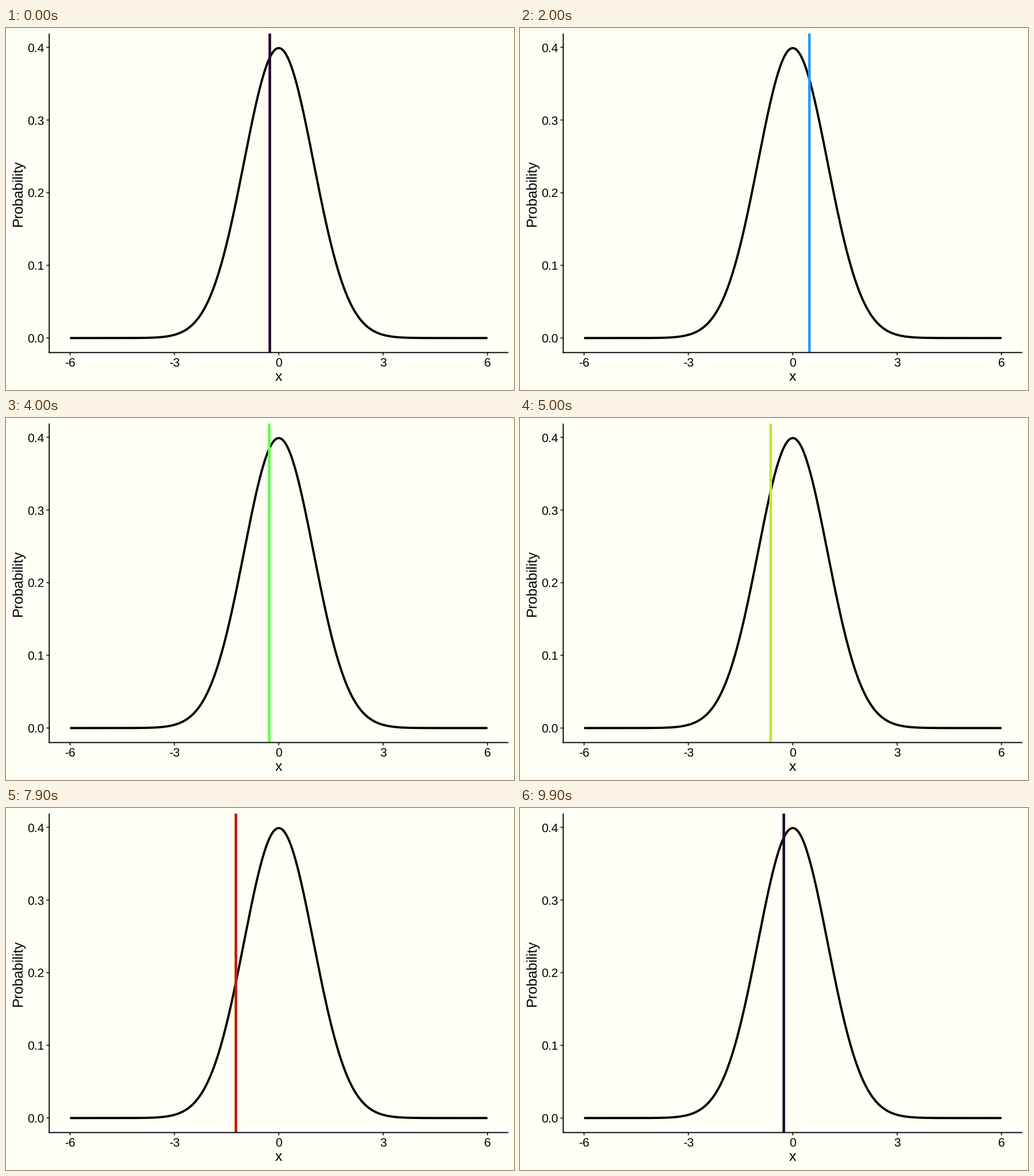
Write a matplotlib script that moves like this. It is 885 px wide and 632 px high and loops after 10 s.

```python
import matplotlib.pyplot as plt
import numpy as np
from matplotlib.animation import FuncAnimation

W, H, DPI = 885, 632, 100
PX = 72 / DPI  # points per pixel
LEFT, RIGHT, TOP, BOTTOM = 75.3, 875.2, 9.7, 566.6
X0, X_UNIT = 475.2, 60.6
Y0, Y_UNIT = 541.3, 1269
TICK_SIZE, TITLE_SIZE = 21.2, 24.8

plt.rcParams.update({
    "font.family": "Liberation Sans",
    "text.hinting": "none",
    "toolbar": "None",
})

fig = plt.figure(figsize=(W / DPI, H / DPI), dpi=DPI, facecolor="#fffff5")
ax = fig.add_axes([0, 0, 1, 1])
ax.set(xlim=(0, W), ylim=(H, 0))
ax.axis("off")


def stroke(xs, ys, width, color="black", z=1):
    line, = ax.plot(xs, ys, color=color, lw=width * PX, zorder=z,
                    solid_capstyle="butt", solid_joinstyle="round", snap=False)
    return line


def label(x, y, text, size, ha="center", **kw):
    ax.text(x, y, text, fontsize=size * PX, ha=ha, va="baseline",
            color="black", **kw)


# Standard normal density
x = np.linspace(-6, 6, 401)
density = np.exp(-x**2 / 2) / np.sqrt(2 * np.pi)
stroke(X0 + X_UNIT * x, Y0 - Y_UNIT * density, 3.9)

# Axes, ticks and labels
stroke([LEFT, LEFT], [TOP, BOTTOM + 0.9], 1.9, z=4)
stroke([LEFT - 0.9, RIGHT], [BOTTOM, BOTTOM], 1.9, z=4)
for value in (-6, -3, 0, 3, 6):
    px = X0 + X_UNIT * value
    stroke([px, px], [BOTTOM, BOTTOM + 4.9], 1.9, "#262626", z=3)
    label(px, 590.7, f"{value}", TICK_SIZE)
for value in (0.0, 0.1, 0.2, 0.3, 0.4):
    py = Y0 - Y_UNIT * value
    stroke([LEFT - 4.9, LEFT], [py, py], 1.9, "#262626", z=3)
    label(66.8, py + 7.7, f"{value:.1f}", TICK_SIZE, ha="right")
label(X0, 616.4, "x", TITLE_SIZE)
label(27.4, 288.3, "Probability", TITLE_SIZE, rotation=90,
      rotation_mode="anchor")

# Sampled positions, each held until the next jump
STARTS = [0, 10, 20, 30, 40, 50, 59, 69, 79, 89, 99]
POSITIONS = [459.6, 510.5, 504.2, 361.5, 458.6, 436.7, 490.6, 459.6,
             400.5, 279.8]
COLORS = plt.get_cmap("turbo")(np.linspace(0, 1, 10))[:, :3] ** 1.22

marker = stroke([POSITIONS[0]] * 2, [TOP, BOTTOM], 4.6, COLORS[0], z=2)


def update(frame):
    step = (np.searchsorted(STARTS, frame, side="right") - 1) % 10
    marker.set_xdata([POSITIONS[step]] * 2)
    marker.set_color(COLORS[step])
    return (marker,)


anim = FuncAnimation(fig, update, frames=100, interval=100, repeat=True,
                     repeat_delay=0)
plt.show()
```
